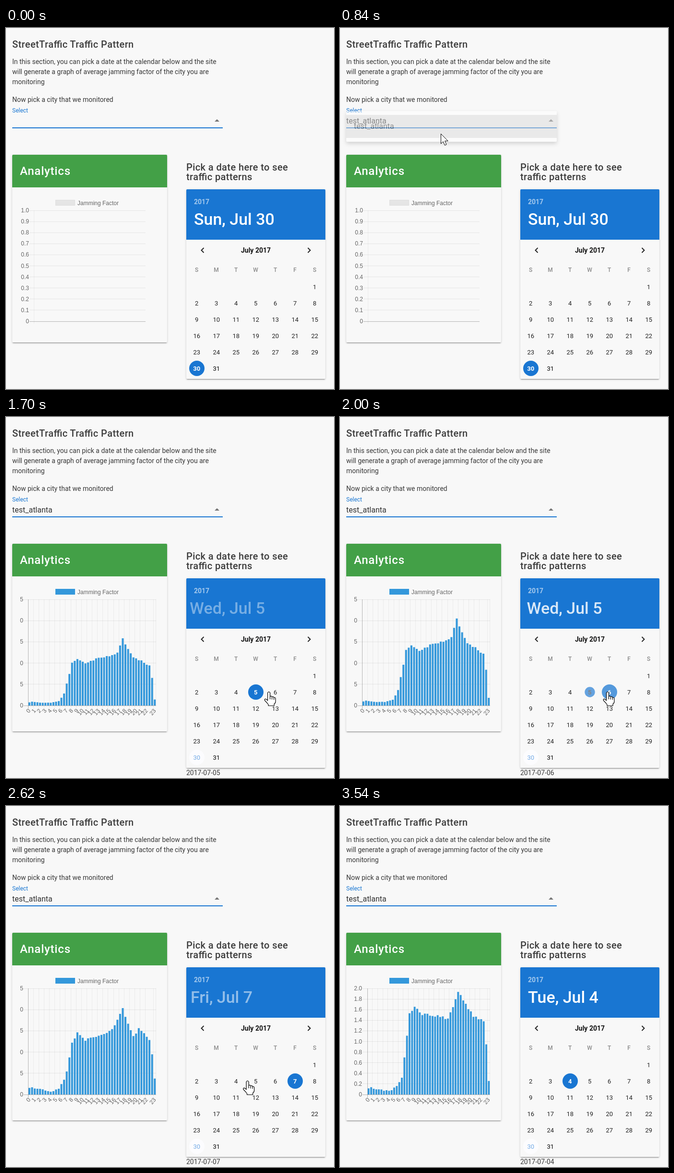
These frames come from a looping animation (684x752 px, 3.72 s). An HTML page:

```html
<!DOCTYPE html>
<html lang="en">
<head>
<meta charset="utf-8">
<title>Traffic Pattern</title>
<style>
html, body { margin: 0; width: 100%; height: 100%; overflow: hidden; background: #f8f8f8; }
.card { position: absolute; background: #f8f8f8; border-radius: 2px;
  box-shadow: 0 3px 1px -2px rgba(0,0,0,.2), 0 2px 2px rgba(0,0,0,.14), 0 1px 5px rgba(0,0,0,.12); }
svg { position: absolute; left: 0; top: 0; display: block; }
text { font-family: Roboto, sans-serif; white-space: pre; }
.h { font-size: 20px; font-weight: 500; letter-spacing: .02em; fill: #3c3c3c;
  font-feature-settings: "liga" 1; }
.p { font-size: 14px; fill: #383838; }
.v { font-size: 16px; fill: #303030; }
.mid { text-anchor: middle; }
.day { font-size: 13px; text-anchor: middle; }
.wd { font-size: 12px; font-weight: 500; text-anchor: middle; fill: #8a8a8a; }
.c { font: 12px "Liberation Sans", Arial, sans-serif; fill: #666; }
.end { text-anchor: end; }
.row { stroke: #000; stroke-opacity: .08; fill: none; }
.col { stroke: #000; stroke-opacity: .05; fill: none; }
.zero { stroke: #000; stroke-opacity: .27; fill: none; }
#menu { filter: drop-shadow(0 4px 4px rgba(0,0,0,.3)); }
</style>
</head>
<body>
<div class="card" style="left:13px;top:264px;width:323px;height:391px"></div>
<div class="card" style="left:376px;top:336px;width:290px;height:395px"></div>
<svg id="stage" width="684" height="752" viewBox="0 0 684 752"></svg>
<script>
const LOOP = 3720, FADE = 150, BASE = 601, RIGHT = 313;
const BLUE = '#1976d2';

const clamp = v => Math.max(0, Math.min(1, v));
const mix = (a, b, p) => a + (b - a) * p;
const ramp = (t, from, len) => clamp((t - from) / len);
const range = n => [...Array(n).keys()];
const snap = v => Math.floor(v) + .5;
const dayX = d => 398 + 41 * ((d + 5) % 7);
const dayY = d => 539 + 34 * Math.floor((d + 5) / 7);

function random(seed) {
  return () => (seed = seed * 16807 % 2147483647) / 2147483647;
}

// a day of 48 half hours: quiet night, steep morning, rough plateau, evening peak
const KNOTS = [0, 8, 11, 13, 14, 16, 18, 21, 27, 31, 33, 35, 37, 39, 41, 45, 46, 47];
function traffic(seed, ...heights) {
  const rnd = random(seed);
  return range(48).map(i => {
    const k = Math.max(1, KNOTS.findIndex(n => n >= i));
    const p = ramp(i, KNOTS[k - 1], KNOTS[k] - KNOTS[k - 1]);
    const h = mix(heights[k - 1], heights[k], p);
    return h + (rnd() - .5) * Math.min(5, h * .3);
  });
}

// over: pointer reaches the day, at: click, x: pointer place
const picks = [
  { over: 1190, at: 1460, day: 5, name: 'Wed', x: 534, left: 46,
    bars: traffic(51, 10, 7, 12, 31, 58, 117, 125, 116, 130, 134, 143, 180, 152, 129, 124, 107, 76, 18) },
  { over: 1810, at: 1950, day: 6, name: 'Thu', x: 558, left: 46,
    bars: traffic(62, 12, 4, 11, 21, 35, 90, 99, 86, 90, 87, 110, 130, 116, 92, 93, 82, 59, 21) },
  { over: 2149, at: 2360, day: 7, name: 'Fri', x: 599, left: 46,
    bars: traffic(73, 17, 6, 11, 33, 49, 109, 133, 119, 130, 146, 165, 188, 155, 127, 146, 121, 91, 35) },
  { over: 2705, at: 2862, day: 4, name: 'Tue', x: 467, left: 57,
    bars: traffic(44, 15, 7, 16, 35, 78, 169, 181, 167, 164, 158, 184, 214, 197, 180, 163, 154, 103, 26) }
];
const FIRST = picks[0].at;

// pointer stops: [time, x, y]
const stops = [
  [80, 628, 118], [200, 395, 260], [310, 205, 258], [380, 205, 200],
  [600, 210, 220], [880, 210, 220], [1080, 577, 580],
  ...picks.flatMap(p => [[p.over, p.x, 572], [p.at + 100, p.x, 572]]),
  [3340, 690, 66]
];

const text = (x, y, cls, s, more = '') => `<text x="${x}" y="${y}" class="${cls}" ${more}>${s}</text>`;
const path = (d, cls) => `<path d="${d}" class="${cls}"/>`;

function axis(id, left, right, bottom, labels, labelX) {
  const gap = (bottom - 380) / (labels.length - 1);
  let rows = '', cols = '', out = '';
  labels.forEach((s, i) => {
    const y = 380 + gap * i;
    out += text(labelX, Math.round(y) + 4, 'c end', s);
    if (i < labels.length - 1) rows += `M${labelX + 1} ${snap(y)}H${right}`;
  });
  out += path(`M${labelX + 1} ${bottom + .5}H${right}`, 'zero');
  if (id === 'empty') {
    cols = `M${left + .5} 380V${bottom + 5}`;
  } else {
    const step = (right - left) / 48;
    range(24).forEach(h => {
      const i = h < 23 ? h * 2 : 47;
      if (i) cols += `M${snap(left + step * i)} 380V${bottom + 7}`;
      const x = left + step * (i + .5);
      out += text(0, 4, 'c end', h, `transform="translate(${x} 609.5) rotate(-50)"`);
    });
    cols += `M${right - .5} 380V${bottom}`;
    out += path(`M${left + .5} 380V${bottom + 7}`, 'zero');
  }
  return `<g id="${id}">${path(rows, 'row')}${path(cols, 'col')}${out}</g>`;
}

const scale = (n, k) => range(n + 1).map(i => i === n ? '0' : ((n - i) * k).toFixed(1));

document.getElementById('stage').innerHTML =
  text(13, 41, 'h', 'StreetTraffic Traffic Pattern') +
  text(13, 75, 'p', 'In this section, you can pick a date at the calendar below and the site') +
  text(13, 96, 'p', 'will generate a graph of average jamming factor of the city you are') +
  text(13, 117, 'p', 'monitoring') +
  text(13, 154, 'p', 'Now pick a city that we monitored') +
  text(13, 176, '', 'Select', `font-size="12" fill="${BLUE}"`) +
  text(13, 199, 'v', 'test_atlanta', 'id="city"') +
  `<path d="M435 195l5-5 5 5z" fill="#757575"/>
   <rect x="13" y="207" width="439" height="2" fill="${BLUE}"/>
   <path d="M13 332V266q0-2 2-2H334q2 0 2 2V332z" fill="#43a047"/>` +
  text(29, 306, '', 'Analytics', 'font-size="24" font-weight="500" letter-spacing=".8" fill="#fff"') +
  '<rect id="key" x="103.5" y="358.5" width="40" height="11"/>' +
  text(149, 369, 'c', 'Jamming Factor') +
  axis('empty', 58, 291, 611, scale(10, .1), 48) +
  axis('small', 46, RIGHT, BASE, [...'505050'], 36) +
  axis('full', 57, RIGHT, BASE, scale(10, .2), 46) +
  '<path id="bars" fill="#3498db"/>' +
  text(376, 297, 'h', 'Pick a date here to see') +
  text(376, 317, 'h', 'traffic patterns') +
  `<path d="M376 441V338q0-2 2-2H664q2 0 2 2V441z" fill="${BLUE}"/>` +
  text(392, 367, '', '2017', 'font-size="14" font-weight="700" fill="#fff" fill-opacity=".6"') +
  text(392, 410, '', '', 'id="head" font-size="34" font-weight="500" fill="#fff"') +
  text(521, 468, 'mid', 'July 2017', 'font-size="14" font-weight="700" fill="#111"') +
  '<path d="M412.5 458l-5 5 5 5M629.5 458l5 5-5 5" fill="none" stroke="#222" stroke-width="2"/>' +
  [...'SMTWTFS'].map((s, i) => text(397.6 + 41 * i, 508, 'wd', s)).join('') +
  '<circle id="pale" r="16" fill="#fcfcfe"/>' +
  range(31).map(i => {
    const d = i + 1, x = dayX(d), y = dayY(d);
    return `<circle id="dot${d}" cx="${x}" cy="${y}" fill="${BLUE}"/>` +
      text(x - .3, y + 5, 'day', d, `id="num${d}"`);
  }).join('') +
  text(376, 746, 'p', '', 'id="date"') +
  `<g id="menu"><rect x="13" y="173" width="439" height="64" rx="2" fill="#fff"/>
   <rect x="13" y="181" width="439" height="48" fill="#dcdcdc"/>` +
  text(29, 210, 'v', 'test_atlanta') + '</g>' +
  `<g id="pointer" fill="#fff" stroke="#000" stroke-linejoin="round">
   <path id="arrow" d="M.5 .5V21l4.7-4.4 3.3 7.7 3.5-1.5-3.3-7.5h6.5z"/>
   <path id="hand" stroke-width="1.2" d="M-2.5 2.5Q0-1.5 2.5 2.5V10.5Q5 8 6.5 11
     Q9.5 9.5 10.5 12.5Q14 11.5 14 15V20.5Q14 24 11 26V29.5H-1V27Q-4 23-8.5 18.5
     Q-9.5 14.5-6 15.5L-2.5 18.5ZM2.5 10.5V16M6.5 11V16.5M10.5 12.5V17"/></g>`;

const el = {};
document.querySelectorAll('[id]').forEach(n => el[n.id] = n);
const set = (id, attrs) => { for (const k in attrs) el[id].setAttribute(k, attrs[k]); };
const show = (id, on) => set(id, { display: on ? 'inline' : 'none' });

function drawDot(d, size, alpha, rest) {
  const w = size * size;
  set('dot' + d, { r: 16 * size, opacity: alpha });
  set('num' + d, {
    fill: `rgb(${rest.map(v => Math.round(mix(v, 255, w)))})`,
    'font-weight': size > .5 ? 700 : 400
  });
}

function drawDays(t) {
  const ink = [34, 34, 34];
  range(29).forEach(i => drawDot(i + 1, 0, 0, ink));
  picks.forEach((p, i) => {
    const next = picks[i + 1];
    const stay = next ? 1 - ramp(t, next.at, FADE) : 1;
    const grow = ramp(t, p.over, FADE);
    drawDot(p.day, grow * stay, (.6 * grow + .4 * ramp(t, p.at, FADE)) * stay, ink);
  });
  const today = 1 - ramp(t, FIRST, FADE);
  drawDot(30, today, today, [116, 171, 230]);
  set('pale', { cx: dayX(30), cy: dayY(30) });
  show('pale', t > FIRST);
}

function drawHead(t) {
  const i = picks.findLastIndex(p => t >= p.at + 25);
  const title = k => k < 0 ? 'Sun, Jul 30' : `${picks[k].name}, Jul ${picks[k].day}`;
  const age = i < 0 ? LOOP : t - picks[i].at - 25;
  const leaving = age < FADE;
  const p = leaving ? 1 - age / FADE : ramp(age, FADE, 160);
  el.head.textContent = title(leaving ? i - 1 : i);
  set('head', { x: 377 + 15 * p, opacity: p });
  el.date.textContent = i < 0 ? '' : '2017-07-0' + picks[i].day;
}

function drawChart(t) {
  const i = picks.findLastIndex(p => t >= p.at + 110);
  const now = picks[i], old = picks[i - 1];
  show('empty', !now);
  show('small', now && now.left === 46);
  show('full', now && now.left === 57);
  set('key', now ? { fill: '#3498db', stroke: '#3498db' } : { fill: '#e5e5e5', stroke: '#dedede' });
  let d = '';
  if (now) {
    const p = 1 - (1 - ramp(t, now.at + 110, 420)) ** 4;
    const left = mix(old ? old.left : now.left, now.left, p), step = (RIGHT - left) / 48;
    now.bars.forEach((h, k) => {
      const top = BASE - mix(old ? old.bars[k] : 0, h, p);
      const x = left + step * (k + .5), half = step * .36;
      d += `M${x - half} ${BASE}V${top}H${x + half}V${BASE}z`;
    });
  }
  set('bars', { d });
}

function drawPointer(t) {
  const i = stops.findIndex(s => s[0] > t);
  show('pointer', i > 0);
  if (i < 1) return;
  const [a, b] = [stops[i - 1], stops[i]];
  const p = ramp(t, a[0], b[0] - a[0]), e = p * p * (3 - 2 * p);
  const x = mix(a[1], b[1], e), y = mix(a[2], b[2], e);
  const hand = x > 380 && y > 555;
  set('pointer', { transform: `translate(${x} ${y})` });
  show('hand', hand);
  show('arrow', !hand);
}

function draw(t) {
  const open = ramp(t, 400, FADE) * (1 - ramp(t, 765, FADE));
  show('city', t >= 760);
  set('menu', { opacity: open });
  show('menu', open > 0);
  drawChart(t);
  drawHead(t);
  drawDays(t);
  drawPointer(t);
}

function tick() {
  draw(Math.floor(performance.now() % LOOP / 20) * 20);
  requestAnimationFrame(tick);
}
tick();
</script>
</body>
</html>
```
